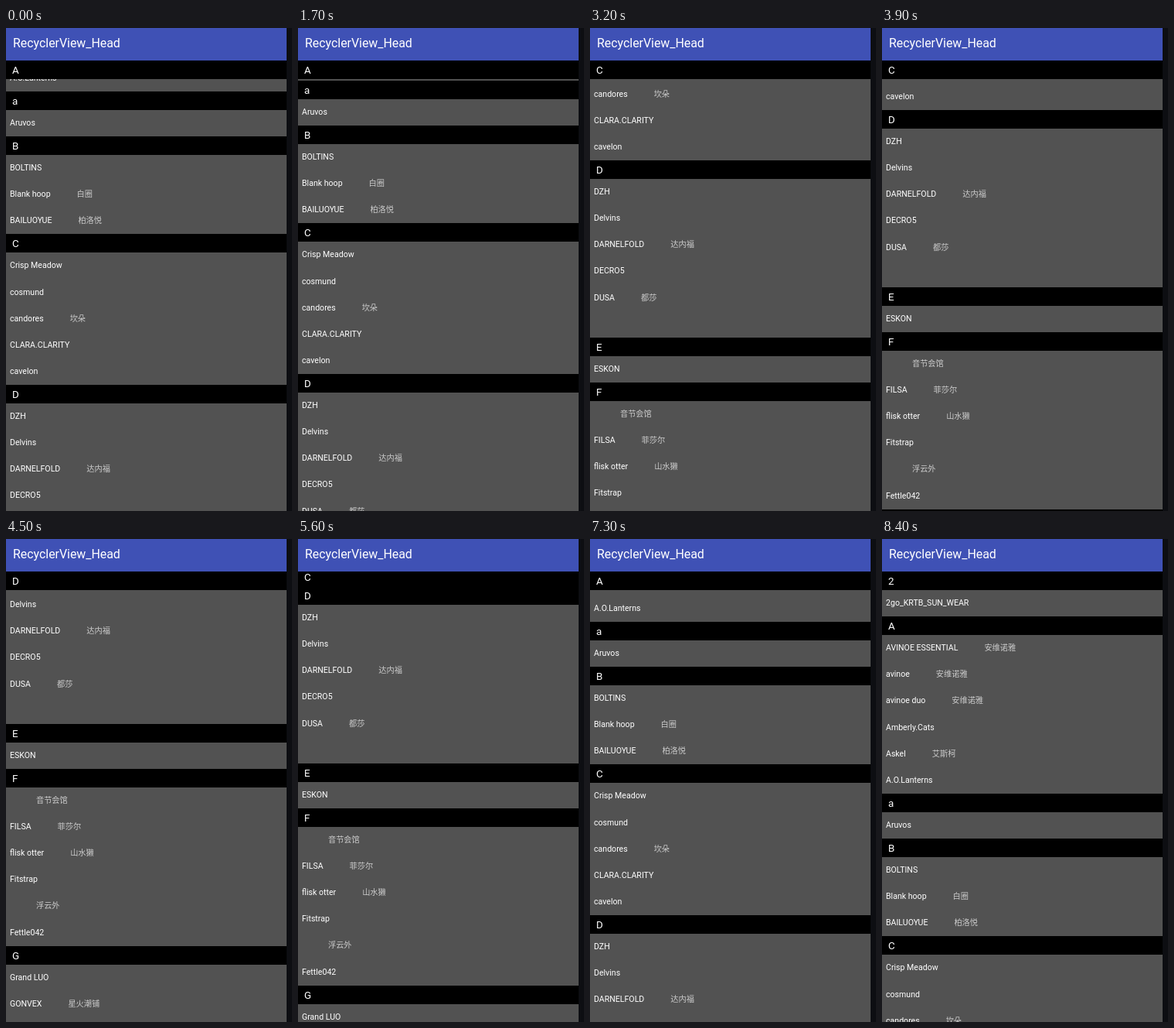
An HTML page for the animation above (9.4 s loop, 370x624 px).

```html
<!DOCTYPE html>
<html lang="en">
<head>
<meta charset="utf-8">
<title>RecyclerView_Head</title>
<style>
html, body { margin: 0; width: 100%; height: 100%; overflow: hidden; background: #0d0e12; }
body { position: relative; color: #fff; font-family: Roboto, "Noto Sans CJK SC", "Noto Sans CJK", sans-serif; white-space: pre; }
#bar { position: absolute; left: 0; top: 0; width: 354px; height: 42px; padding-left: 9px; background: #3f51b5; font-size: 15.9px; line-height: 40px; }
#list { position: absolute; left: 0; top: 42px; width: 363px; height: 582px; overflow: hidden; background: #525252; }
#rows, #pin { position: absolute; left: 0; top: 0; width: 100%; }
.head { box-sizing: border-box; height: 24px; padding-left: 8px; background: #000; font-size: 13.4px; line-height: 25px; }
.row { height: 34.13px; padding-left: 5px; font-size: 10.58px; line-height: 34.13px; overflow: hidden; }
.row span { margin-left: 34px; color: #ccc; font-size: 10.2px; }
</style>
</head>
<body>
<div id="bar">RecyclerView_Head</div>
<div id="list"><div id="rows"></div><div id="pin" class="head"></div></div>
<script>
const HEAD = 24, ROW = 34.13, LOOP = 9400, STEP = 100;

// Each entry is "name|local name"
const sections = [
  ['2', '2go_KRTB_SUN_WEAR'],
  ['A', 'AVINOE ESSENTIAL|安维诺雅', 'avinoe|安维诺雅', 'avinoe duo|安维诺雅', 'Amberly.Cats', 'Askel|艾斯柯', 'A.O.Lanterns'],
  ['a', 'Aruvos'],
  ['B', 'BOLTINS', 'Blank hoop|白圈', 'BAILUOYUE|柏洛悦'],
  ['C', 'Crisp Meadow', 'cosmund', 'candores|坎朵', 'CLARA.CLARITY', 'cavelon'],
  ['D', 'DZH', 'Delvins', 'DARNELFOLD|达内福', 'DECRO5', 'DUSA|都莎', ''],
  ['E', 'ESKON'],
  ['F', '|音节会馆', 'FILSA|菲莎尔', 'flisk otter|山水獭', 'Fitstrap', '|浮云外', 'Fettle042'],
  ['G', 'Grand LUO', 'GONVEX|星火潮铺', '']
];

// [time, scroll offset]
const keys = [
  [0, 247], [1600, 247], [1700, 261], [1900, 300], [2200, 390], [2500, 460], [2800, 507], [3200, 537],
  [3600, 537], [3700, 545], [3900, 602], [4100, 668], [4300, 697], [4400, 697], [4500, 698],
  [4600, 698], [4900, 710], [5100, 710], [5200, 703], [5400, 678], [5600, 647], [5900, 597],
  [6200, 563], [6500, 543], [6600, 539], [6700, 522], [6900, 450], [7100, 338], [7300, 222],
  [7500, 124], [7700, 55], [7900, 15], [8100, 0], [LOOP, 0]
];

const rows = document.getElementById('rows');
const pin = document.getElementById('pin');

function add(parent, tag, cls, text) {
  const el = parent.appendChild(document.createElement(tag));
  el.className = cls;
  el.textContent = text;
  return el;
}

let end = 0;
const tops = sections.map(([letter, ...items]) => {
  const top = end;
  add(rows, 'div', 'head', letter);
  for (const item of items) {
    const [name, local] = item.split('|');
    const row = add(rows, 'div', 'row', name);
    if (local) add(row, 'span', '', local);
  }
  end += HEAD + items.length * ROW;
  return top;
});

function scrollAt(t) {
  const i = keys.findIndex(k => k[0] > t);
  const [t0, s0] = keys[i - 1], [t1, s1] = keys[i];
  return Math.round(s0 + (s1 - s0) * (t - t0) / (t1 - t0));
}

function draw(now) {
  const t = Math.floor(now % LOOP / STEP) * STEP;
  const s = scrollAt(t);
  const i = tops.filter(top => top <= s).length - 1;
  const next = i + 1 < tops.length ? tops[i + 1] : Infinity;
  rows.style.top = -s + 'px';
  pin.textContent = sections[i][0];
  // The following header pushes the pinned one out
  pin.style.top = Math.min(0, next - s - HEAD) + 'px';
}

const start = performance.now();
function tick() {
  draw(performance.now() - start);
  requestAnimationFrame(tick);
}
tick();
</script>
</body>
</html>
```
